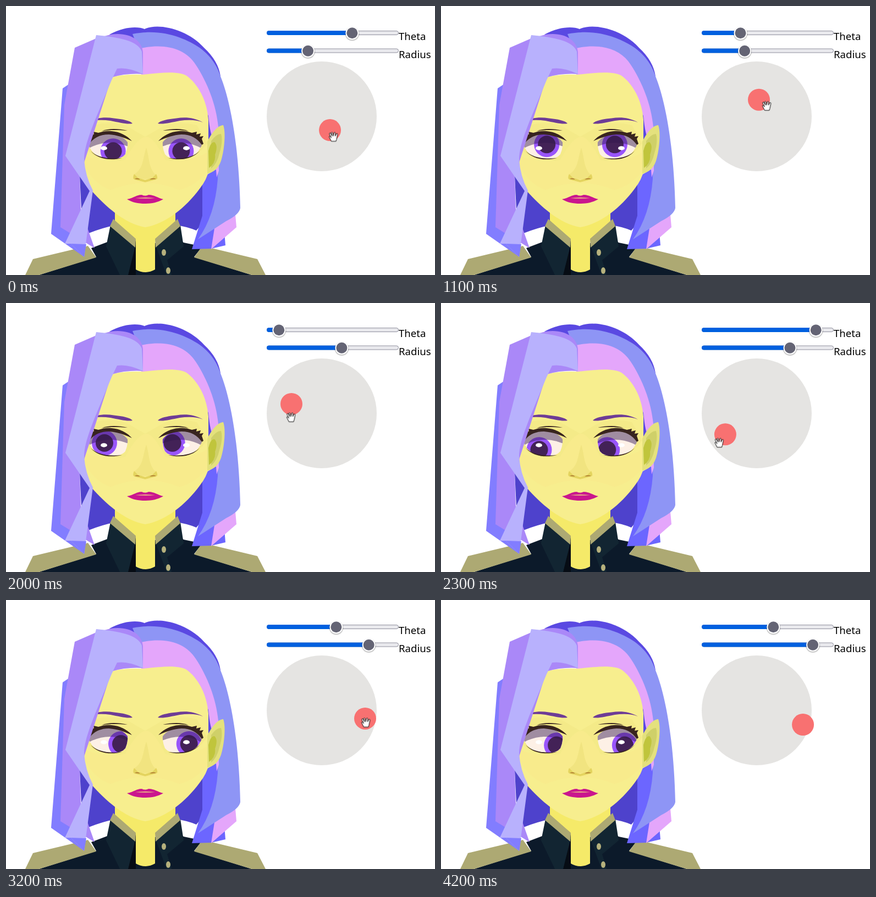
Animation of 780x490 px, one loop 4.3 s. Source, as an HTML page without scripts:

```html
<!DOCTYPE html>
<html lang="en">
<head>
<meta charset="utf-8">
<title>Eye control</title>
<style>
  @property --t { syntax: "<number>"; inherits: true; initial-value: 59; }
  @property --r { syntax: "<number>"; inherits: true; initial-value: 29; }

  html, body { margin: 0; width: 100%; height: 100%; overflow: hidden; background: #fff; }

  svg {
    display: block;
    width: 780px;
    height: 490px;
    --x: calc(cos(var(--t) * 1deg) * var(--r));
    --y: calc(sin(var(--t) * 1deg) * var(--r));
    animation: drag 4.3s infinite;
  }

  /* polar position of the handle, updated every 100 ms */
  @keyframes drag {
    0%      { --t: 59;     --r: 29.2; animation-timing-function: steps(7); }
    16.27%  { --t: -15.4;  --r: 41.5; animation-timing-function: steps(8); }
    34.88%  { --t: -149.5; --r: 19.7; animation-timing-function: steps(5); }
    46.51%  { --t: -162.8; --r: 57.6; animation-timing-function: step-end; }
    48.83%  { --t: 179;    --r: 61;   animation-timing-function: steps(6); }
    62.79%  { --t: 80.4;   --r: 84.2; animation-timing-function: steps(5); }
    74.41%  { --t: 10.7;   --r: 80.4; animation-timing-function: steps(10); }
    97.67%, 100% { --t: 17.2; --r: 88; }
  }

  @keyframes hand {
    0%      { transform: translate(6px, 12px);  animation-timing-function: steps(7); }
    16.27%  { transform: translate(7px, -5px);  animation-timing-function: steps(8); }
    34.88%  { transform: translate(21px, 27px); animation-timing-function: steps(5); }
    46.51%  { transform: translate(-1px, 24px); animation-timing-function: steps(7); }
    62.79%  { transform: translate(-25px, 3px); animation-timing-function: steps(5); }
    74.41%, 100% { transform: translate(1px, 7px); }
  }

  @keyframes leave { 0% { opacity: 1; } 88.36%, 100% { opacity: 0; } }

  .handle { transform: translate(calc(var(--x) * 1px), calc(var(--y) * 1px)); }
  .gaze   { transform: translate(calc(var(--x) * .224px), calc(var(--y) * .22px)); }
  .hand   { animation: hand 4.3s infinite, leave 4.3s step-end infinite; }

  .theta  { --v: calc(var(--t) * .6px + 120px); }
  .radius { --v: calc(var(--r) * 2.16px + 12px); }
  .fill   { width: var(--v); fill: #0060df; }
  .thumb  { transform: translateX(var(--v)); }

  text { font: 18.6px "Noto Sans", "Open Sans", sans-serif; fill: #000; }
</style>
</head>
<body>
<svg viewBox="0 0 780 490">
  <defs>
    <path id="opening" d="M150 254C155 240 168 233 187 233C203 233 214 239 221 248Q222 258 217 270Q211 278 194 279C178 280 163 273 156 264Z"/>
    <clipPath id="eyes">
      <use href="#opening"/>
      <use href="#opening" transform="translate(506) scale(-1 1)"/>
    </clipPath>
    <g id="iris">
      <circle r="23" fill="#9955fb"/>
      <circle r="16" fill="#432257"/>
    </g>
    <g id="lid">
      <ellipse cx="178" cy="259" rx="6" ry="3.7" fill="#fff"/>
      <path d="M149 260Q184 240 222 256V228H149Z" fill="#2f144d" fill-opacity=".45"/>
    </g>
    <g id="lashes" fill="#38241f">
      <path d="M147 251L150 242L147 237L154 238L152 232L160 234L159 229L168 231C176 228 184 227 192 228C207 229 220 236 229 246C213 239 202 235 187 234C170 234 158 241 150 253Z"/>
      <path d="M174 228C188 222 206 224 221 227C206 226 190 225 174 228Z"/>
      <path d="M154 264C164 274 182 280 211 277C186 283 165 277 154 264Z"/>
    </g>
    <path id="brow" d="M148 212C164 203 180 202 196 204.500C212 206 226 209 230 214C220 216 206 212 190 209C175 207 160 207 148 212Z" fill="#6e3c96"/>
    <g id="slider">
      <rect x=".5" y="-3" width="239" height="7" rx="3.5" fill="#e9e9ed" stroke="#8f8f9d"/>
      <rect class="fill" y="-3.5" height="8" rx="4"/>
      <g class="thumb">
        <circle cy="2" r="13" fill="#000" fill-opacity=".2"/>
        <circle cy=".7" r="12" fill="#fff"/>
        <circle cy=".7" r="10" fill="#646474"/>
      </g>
    </g>
  </defs>

  <!-- back hair and neck -->
  <path d="M134 310L137 370L150 414Q175 404 200 399H308Q330 402 346 409L358 395V300L253 250Z" fill="#4e42cc"/>
  <path d="M198 350H308V395L271 430V490H236V430L198 395Z" fill="#f5ea69"/>

  <!-- uniform -->
  <path d="M184 430L155 441L164 457L60 490H447L342 457L357 438L323 431L300 412L271 432V480Q253 490 236 480V432L205 412Z" fill="#0c1a2a"/>
  <path d="M236 425L222 490H236Z" fill="#060c14"/>
  <path d="M190 399L182 438L207 490H222L236 434ZM317 399L323 438L293 463L301 490H292L271 434Z" fill="#122532"/>
  <path d="M195 388L236 424L235 440L189 401ZM312 388L271 424L272 440L317 401ZM49 461L149 437L164 458L60 490H35ZM357 437L457 461L472 490H447L342 458Z" fill="#ada973"/>
  <g fill="#b6b17d">
    <ellipse cx="287" cy="449" rx="4" ry="6"/>
    <ellipse cx="295" cy="482" rx="4" ry="6"/>
  </g>

  <!-- right hair -->
  <path d="M188 52C215 37 240 37 252 42C276 30 330 42 360 76Q386 100 390 128L380 245H360V190Z" fill="#5a49e2"/>
  <path d="M386 295L366 307L357 325V382L338 443L373 442L399 436L396 400Z" fill="#6c66ff"/>
  <path d="M417 380L419 403L373 443L379 405Z" fill="#e4a6fb"/>
  <path d="M230 51C285 40 328 60 352 76C378 95 386 116 390 128C411 180 424 270 426 368Q424 380 400 392L349 425Q380 382 385 315V240L340 110L246 90Z" fill="#8e95f5"/>
  <path d="M245 77C290 67 327 78 345 107C366 139 382 179 386 220L387 300L383 312L378 245Q371 235 368 200L335 135L246 130Z" fill="#e4a6fb"/>

  <!-- face -->
  <path d="M180 133Q208 123 250 125C285 121 318 118 331 129C354 148 366 178 368 207V300Q366 315 352 333C326 368 290 397 253 403C216 397 180 364 156 337L136 285Z" fill="#f7ee8e"/>
  <path d="M160 217Q205 207 232 226L253 238L274 226Q301 207 347 217L366 250Q340 288 290 281L255 240L217 281Q165 288 142 255Z" fill="#f4ea88"/>
  <path d="M141 272Q188 290 217 280Q238 240 255 238Q270 240 290 281Q330 288 367 266V300Q345 328 315 335Q253 310 190 335Q160 325 142 290Z" fill="#f8eb8c"/>

  <!-- nose and mouth -->
  <path d="M255 258C261 276 259 295 272 307L276 315H231L234 306C250 296 249 276 255 258Z" fill="#f1e480"/>
  <path d="M233 306Q228 316 237 317L253 321L269 317Q279 316 273 306L266 313L253 317L240 313Z" fill="#e4d45f"/>
  <path d="M234 315Q239 312 244 316ZM261 316Q267 312 273 315Z" fill="#a9722c"/>
  <path d="M220 352C234 349 239 343 247 344Q253 347 259 344C267 343 275 349 286 352C275 358 265 360 253 360C240 360 230 358 220 352Z" fill="#ca168e"/>
  <path d="M235 350Q253 347 271 350Q253 352 235 350Z" fill="#e59a86"/>

  <!-- eyes -->
  <g clip-path="url(#eyes)">
    <path d="M140 225H366V285H140Z" fill="#fdf0e6"/>
    <g class="gaze">
      <use href="#iris" x="191.3" y="258.8"/>
      <use href="#iris" x="315" y="258.8"/>
    </g>
    <use href="#lid"/>
    <use href="#lid" transform="translate(506) scale(-1 1)"/>
  </g>
  <g id="trim">
    <use href="#lashes"/>
    <use href="#brow"/>
  </g>
  <use href="#trim" transform="translate(506) scale(-1 1)"/>

  <!-- ear -->
  <path d="M366 247C374 231 384 218 395 217C400 230 397 262 391 282C386 297 376 303 366 306Z" fill="#e4e17d"/>
  <path d="M373 246Q382 233 391 233Q395 246 388 268Q384 287 373 296Z" fill="#cfd069"/>
  <path d="M368 264Q372 247 379 248Q386 254 380 271Q382 285 369 295Z" fill="#c0c53c"/>

  <!-- left hair -->
  <path d="M103 150L82 415L142 457L146 425L125 380L118 140Z" fill="#827dff"/>
  <path d="M125 76L164 59L190 52C225 47 247 62 249 84V124Q220 122 192 130L134 310L136 370L161 441L99 403L106 180Z" fill="#aa88f8"/>
  <path d="M164 53C205 57 240 63 247 83L249 124Q223 111 202 114L192 135L163 205C151 235 142 260 142 279Q144 310 158 336L142 457L118 433H107L152 337L108 273Z" fill="#b8b1fd"/>
  <path d="M118 433L146 434L142 457Z" fill="#827dff"/>

  <!-- controls -->
  <g class="theta" transform="translate(474 48.5)"><use href="#slider"/></g>
  <g class="radius" transform="translate(474 81)"><use href="#slider"/></g>
  <text x="714" y="62">Theta</text>
  <text x="714" y="95">Radius</text>

  <g transform="translate(574 201)">
    <circle r="100" fill="#e5e4e2"/>
    <g class="handle">
      <circle r="20" fill="#f87171"/>
      <g class="hand">
        <path transform="scale(1.2)" d="M-3 7L-6 1q-1-2 1-1.500l2 2L-6-4q0-2 2-1.500L-2-1-3-6q1-2 2 0L0-1 1-6q1.500-1.500 2 0L3-1 4.500-4.500q2-1 2 1L5 4 4 7Z" fill="#fff" stroke="#000" stroke-width=".8" stroke-linejoin="round"/>
      </g>
    </g>
  </g>
</svg>
</body>
</html>
```
